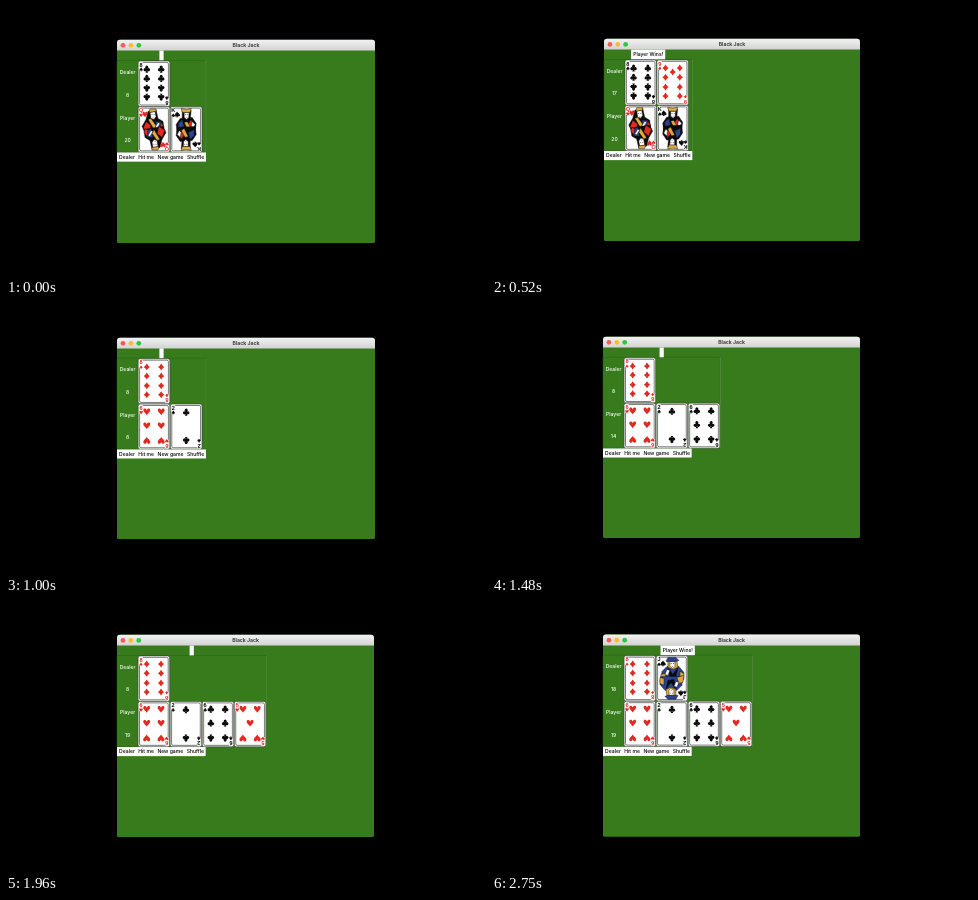
Recreate the animation shown at these times as an HTML page with a canvas. Size 480 by 270 pixels, loop 2.96 s.

```html
<!DOCTYPE html>
<html lang="en">
<head>
<meta charset="utf-8">
<title>Black Jack</title>
<style>
  html, body { margin: 0; width: 100%; height: 100%; overflow: hidden; background: #000; }
  canvas { display: block; }
</style>
</head>
<body>
<canvas id="stage" width="480" height="270"></canvas>
<script>
const ctx = document.getElementById('stage').getContext('2d');
const RED = '#df2b22', BLACK = '#0a0a0a', BLUE = '#2b4291', GOLD = '#dfab3c', GREEN = '#377b1c';

// Suit outlines in a box from -1 to 1
const SUITS = {
  D: 'M0-1Q.34-.34 .9 0Q.34.34 0 1Q-.34.34-.9 0Q-.34-.34 0-1Z',
  H: 'M0 1C-.2.5-1 .15-1-.4C-1-1.1-.15-1.1 0-.4C.15-1.1 1-1.1 1-.4C1 .15.2.5 0 1Z',
  S: 'M0-1C.2-.5 1-.2 1 .3C1 .85.25.8.1.45L.35 1H-.35L-.1.45C-.25.8-1 .85-1 .3C-1-.2-.2-.5 0-1Z',
  C: 'M-.2-.15A.44.44 0 1 1 .2-.15A.44.44 0 1 1 .12.4L.35 1H-.35L-.12.4A.44.44 0 1 1-.2-.15Z'
};
for (const s in SUITS) SUITS[s] = new Path2D(SUITS[s]);
const ink = suit => 'DH'.includes(suit) ? RED : BLACK;

// Pip places on a card, measured from its centre
const pairs = rows => rows.flatMap(y => [[-7.2, y], [7.2, y]]);
const PIPS = {
  2: [[0, -14.5], [0, 14]],
  5: [...pairs([-15, 14]), [0, -1]],
  6: pairs([-15, -1, 14]),
  8: pairs([-14.5, -5.3, 4.5, 13.5]),
  9: [...pairs([-14.5, -5.3, 4.5, 13.5]), [0, -10.5]]
};

// Upper half of each court figure, back to front
const COURTS = {
  Q: [
    [BLACK, 'M-9 3L-12-3L-8-10L-6-18L2-20L4-11L9-8L10 0Z'],
    [RED, 'M-11-1L-8-8L-3-4L-5 3Z'],
    [BLUE, 'M1-8L7-8L9-2L3 1Z'],
    [GOLD, 'M-6-10L-3-11L2-4L0 0Z'],
    ['#fff', 'M-4-17L1-18L2-13L0-10L-3-11Z'],
    [GOLD, 'M-5-17L-4-20.5L2-20.5L2-18Z'],
    ['#fff', 'M4-7L6-6L3-1L1-2Z'],
    [RED, 'M7-7L10-3L9 1L6-1Z']
  ],
  K: [
    [BLACK, 'M-9 3L-10-5L-6-11L6-12L10-6L9 2Z'],
    [BLUE, 'M-8 0L-8-6L-4-10L-2-3Z'],
    [RED, 'M-3-10L0-3L5-10L7-5L2 1Z'],
    [GOLD, 'M-2-7L1-8L5-1L2 1Z'],
    [BLACK, 'M-4-19L5-19L4-10L0-8L-4-11Z'],
    ['#fff', 'M-2-17H3L2.5-12L.5-10L-2-12Z'],
    [GOLD, 'M-4-17L-5-21L0-20L5-21L4-17Z'],
    ['#fff', 'M6-8L9-5L7-1L5-3Z']
  ],
  J: [
    [BLUE, 'M-11 2L-10-7L-5-12L7-12L12-6L11 2Z'],
    [GOLD, 'M-12 3L-11-4L-7-5L-5 1Z'],
    [GOLD, 'M8-7L12-5L12 1L8 0Z'],
    [BLACK, 'M-4-11L1-4L6-11L4-2L-2-1Z'],
    [GOLD, 'M-4-18H5L6-11L1-9L-4-11Z'],
    ['#fff', 'M-2-17H3L3-12L1-10L-2-12Z'],
    [BLUE, 'M-6-17L-4-21H4L7-18L4-17Z'],
    ['#fff', 'M-5-9L-2-8L-4-3L-7-4Z']
  ]
};

// win: x, y, width, height of the window
const SCENES = [
  { until: 520,  win: [111, 33.7, 258, 203.2],   dealer: '8C',    player: 'QH KS',       scores: [8, 20] },
  { until: 1000, win: [112, 32.8, 256, 202.2],   dealer: '8C 9D', player: 'QH KS',       scores: [17, 20], message: 'Player Wins!' },
  { until: 1480, win: [111, 33.7, 258, 201.3],   dealer: '8D',    player: '6H 2C',       scores: [8, 8] },
  { until: 1960, win: [111, 32.8, 257, 201.2],   dealer: '8D',    player: '6H 2C 6C',    scores: [8, 14] },
  { until: 2440, win: [111, 32.8, 257, 202.2],   dealer: '8D',    player: '6H 2C 6C 5H', scores: [8, 19] },
  { until: 2960, win: [111, 32.6, 257, 202.2],   dealer: '8D JS', player: '6H 2C 6C 5H', scores: [18, 19], message: 'Player Wins!' }
];

function rect(x, y, w, h, color) {
  ctx.fillStyle = color;
  ctx.fillRect(x, y, w, h);
}

function box(x, y, w, h, r, fill, line, width = 0.6) {
  ctx.beginPath();
  ctx.roundRect(x, y, w, h, r);
  if (fill) { ctx.fillStyle = fill; ctx.fill(); }
  if (line) { ctx.strokeStyle = line; ctx.lineWidth = width; ctx.stroke(); }
}

function text(str, x, y, color, font = '500 5.1px Inter, sans-serif') {
  ctx.font = font;
  ctx.textAlign = 'center';
  ctx.textBaseline = 'middle';
  ctx.fillStyle = color;
  ctx.fillText(str, x, y);
}

function dot(x, y, r, color) {
  ctx.fillStyle = color;
  ctx.beginPath();
  ctx.arc(x, y, r, 0, 7);
  ctx.fill();
}

function pip(suit, x, y, size, flip) {
  ctx.save();
  ctx.translate(x, y);
  ctx.scale(size, flip ? -size : size);
  ctx.fillStyle = ink(suit);
  ctx.fill(SUITS[suit]);
  ctx.restore();
}

// Draws the same thing upright and turned by 180 degrees
function twice(draw) {
  for (let i = 0; i < 2; i++) {
    draw();
    ctx.rotate(Math.PI);
  }
}

function court(rank, suit) {
  ctx.strokeStyle = BLACK;
  ctx.lineWidth = 0.45;
  twice(() => {
    for (const [color, d] of COURTS[rank]) {
      const path = new Path2D(d);
      ctx.fillStyle = color;
      ctx.fill(path);
      ctx.stroke(path);
    }
    // Eyes and mouth
    const x = rank === 'Q' ? -1 : 0.5;
    rect(x - 1.6, -15, 1, 0.6, BLACK);
    rect(x + 0.6, -15, 1, 0.6, BLACK);
    rect(x - 0.6, -12.3, 1.2, 0.5, RED);
    pip(suit, -9, -15, 2.8);
  });
}

function card(name, x, y) {
  const [rank, suit] = name;
  box(x, y, 31.6, 45.3, 2, '#fff', '#333', 0.5);
  box(x + 1.4, y + 1.4, 28.8, 42.5, 1.5, null, '#222', 0.6);
  ctx.save();
  ctx.translate(x + 15.8, y + 22.65);
  if (PIPS[rank]) PIPS[rank].forEach(([px, py]) => pip(suit, px, py, 3.5, py > 0));
  else court(rank, suit);
  twice(() => {
    rect(-14.9, -21.6, 3.8, 8.4, '#fff');
    text(rank, -12.9, -18.6, ink(suit), 'bold 5.6px "Liberation Sans", sans-serif');
    pip(suit, -12.9, -14.2, 1.8);
  });
  ctx.restore();
}

function drawScene({ win: [x, y, w, h], dealer, player, scores, message }) {
  rect(0, 0, 480, 270, '#000');
  ctx.save();
  ctx.translate(x, y);
  ctx.scale(w / 258, h / 202.5);

  box(0, 0, 258, 202.5, [3, 3, 1.5, 1.5], GREEN);
  const bar = ctx.createLinearGradient(0, 0, 0, 10.8);
  bar.addColorStop(0, '#f3f2f3');
  bar.addColorStop(1, '#d4d3d4');
  box(0, 0, 258, 10.8, [3, 3, 0, 0], bar);
  ['#fc5b56', '#fdbb32', '#2cc840'].forEach((c, i) => dot(6 + i * 7.9, 5.6, 2.4, c));
  text('Black Jack', 129, 5.7, '#3c3c3c', '700 5.1px Inter, sans-serif');

  const hands = [dealer.split(' '), player.split(' ')];
  const right = Math.max(89, 21.2 + hands[1].length * 32.2);
  box(0, 20.7, right, 91.4, 0, null, '#2a6015', 0.5);
  rect(right - 0.3, 20.7, 0.5, 91.4, '#6a9c55');

  const half = message ? 17.2 : 2.1;
  rect(right / 2 - half, 10.8, half * 2, 9.8, '#fff');
  if (message) text(message, right / 2, 15.8, '#000');

  hands.forEach((hand, row) => {
    const top = 21.2 + row * 45.6;
    text(row ? 'Player' : 'Dealer', 10.6, top + 11.2, '#fff');
    text(scores[row], 10.6, top + 34, '#fff');
    hand.forEach((name, i) => card(name, 21.2 + i * 32.2, top));
  });

  rect(0, 112.4, 89, 9.1, '#fff');
  [['Dealer', 10], ['Hit me', 29.2], ['New game', 53.5], ['Shuffle', 78.6]]
    .forEach(([label, cx]) => text(label, cx, 117, '#000'));
  ctx.restore();
}

function tick() {
  const t = performance.now() % 2960;
  drawScene(SCENES.find(s => t < s.until));
  requestAnimationFrame(tick);
}
tick();
</script>
</body>
</html>
```
